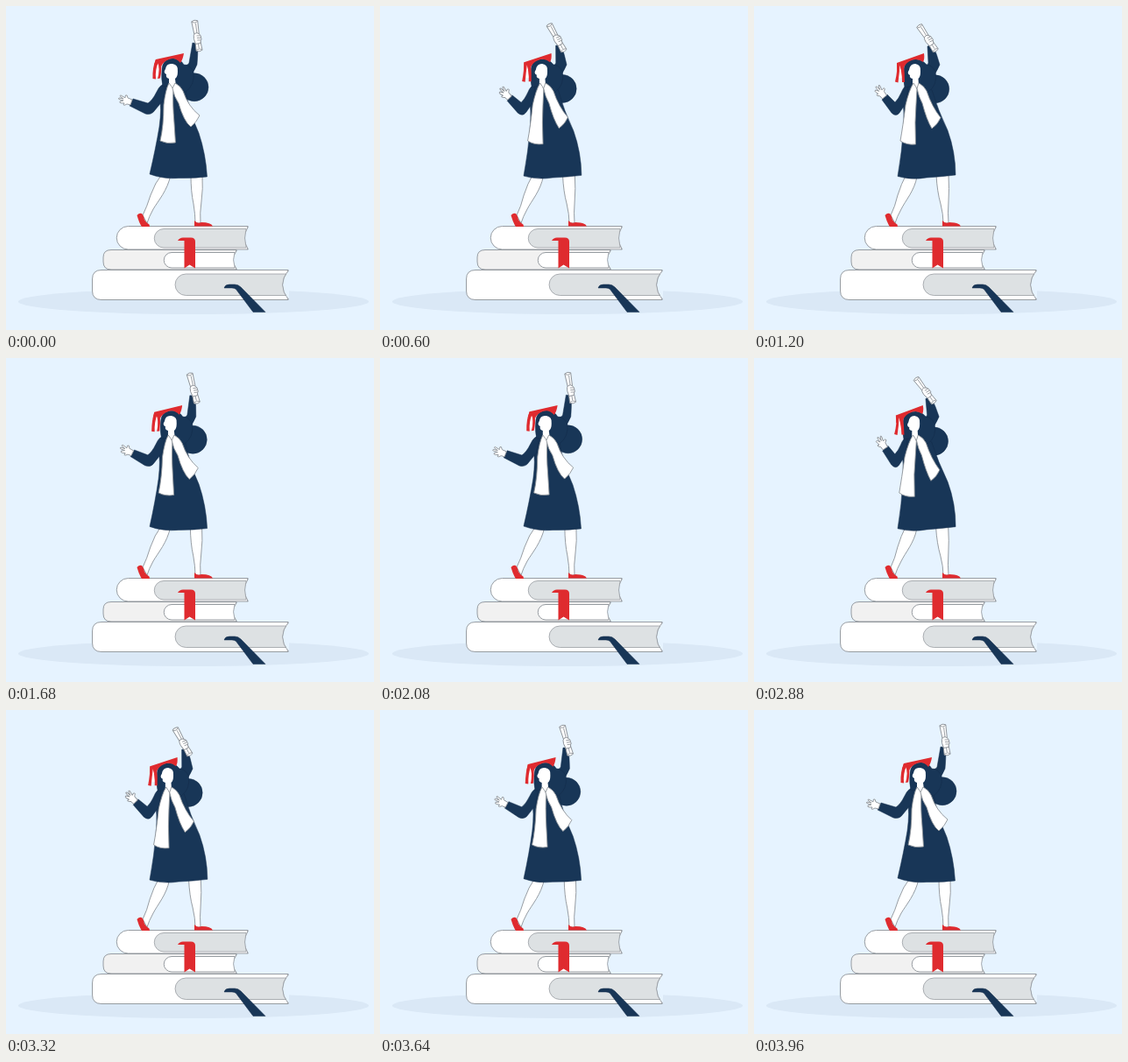
Animation, 420 px wide and 370 px high, one loop 4 s. Source, as an HTML page:

```html
<!DOCTYPE html>
<html lang="en">
<head>
<meta charset="utf-8">
<title>Graduate on books</title>
<style>
html, body { margin: 0; width: 100%; height: 100%; overflow: hidden; background: #e6f3ff; }
svg { display: block; width: 100%; height: 100%; }
.white { fill: #fff; stroke: #8d9298; stroke-width: .9; stroke-linejoin: round; }
.page { fill: #dde1e3; stroke: #9a9ea3; stroke-width: .8; }
.navy { fill: #183657; stroke: #122b48; stroke-width: .5; stroke-linejoin: round; }
.red { fill: #df2b2f; }
.line { fill: none; stroke: #8d9298; stroke-width: .8; stroke-linecap: round; }
</style>
</head>
<body>
<svg viewBox="0 0 420 370">
  <ellipse cx="214" cy="337.500" rx="200" ry="14.500" fill="#dae8f6"/>

  <g id="books">
    <path class="white" d="M322 301.500H109Q98.500 301.500 98.500 312V325Q98.500 335.500 109 335.500H322Z"/>
    <path class="page" d="M320 306H205.300A12.250 12.250 0 0 0 205.300 330.500H320Q312 318 320 306Z"/>
    <path d="M323 302.500Q309 318.500 323 334.500Z" fill="#e6f3ff"/>
    <path class="line" d="M322 302Q309 318.500 322 335"/>

    <path class="white" d="M263 278.500H120Q111 278.500 111 287V292Q111 301 120 301H263Z" style="fill:#f1f1f1"/>
    <path class="white" d="M261 281.500H189A8.750 8.750 0 0 0 189 299H261Z"/>
    <path d="M264 279.500Q255 290 264 300.500Z" fill="#e6f3ff"/>
    <path class="line" d="M263 279Q256 290 263 300.500"/>

    <path class="white" d="M276 251.500H139.500A13.250 13.250 0 0 0 139.500 278H276Z"/>
    <path class="page" d="M274 254.500H180A10.750 10.750 0 0 0 180 276H274Z"/>
    <path d="M277 252.500Q268 265 277 277.500Z" fill="#e6f3ff"/>
    <path class="line" d="M276 252Q269 265 276 278"/>

    <path class="red" d="M196 268Q198 264.500 202 264.500H211Q216 264.500 216 269V299.500L209.500 295.500L203.500 299.500V268Z"/>
    <path class="navy" d="M249 322Q250 318 255 318H261Q265 318 268 321L296 349.500H282L262.500 323.500Q261 322 258 322Z"/>
  </g>

  <g id="legs">
    <path class="white" d="M178 192Q170 202 165 216Q161 229 156 239L161 248Q163 241 168 232C174 222 184 211 188 193Z"
      data-to="M174 192Q168 203 164 216Q161 229 156 239L161 248Q163 241 168 232C173 222 183 211 186 195Z"/>
    <path class="white" d="M211 193Q211 212 214 226Q216 238 216 248L222 248Q221 237 223 223Q225 209 224 193Z"
      data-to="M208 193Q209 212 213 226Q216 238 216 248L222 248Q221 237 222 223Q223 209 222 193Z"/>
    <path class="red" d="M149.500 239Q152 236 155 237Q157 239 158 244Q160 248 163.500 249.500L164 252H155Q152 248 149.500 239Z"/>
    <path class="red" d="M215 245Q218 249 223 247Q234 247 236 251.500H215Z"/>
  </g>

  <path class="navy" d="M213 42L219 43Q219 57 218 67Q214 77 206 86L196 84L199 69Q208 68 209 65Z"
    data-to="M198 46L204 44Q209 56 212 67Q208 77 200 86L189 84L191 68Q198 69 199 65Z"/>
  <circle class="navy" r="16" transform="translate(215 92.700)" data-to="translate(206.700 94.800)"/>

  <path class="navy" d="M182 89Q175 92 175 104Q178 116 175 138Q171 162 164 192Q180 198 197 196.500Q214 197 229.500 195Q228 169 220 145Q209 121 205 96Q199 89 190 88Z"
    data-to="M176 90Q170 93 169 105Q172 118 170.500 139Q169 166 164 194.500Q180 199 197 196Q214 195 230 193Q230 167 221 142Q210 119 203 96Q193 89 184 88Z"/>
  <path class="navy" d="M182 89Q176 89 172 98Q167 108 162 111L145 106L141 114L159 123Q166 125 170 119L179 108Z"
    data-to="M176 90Q171 91 168 99Q165 106 161 110L152 101L146 107L157 122Q162 127 166 122L174 110Z"/>

  <g class="white" transform="translate(143 110) rotate(0)" data-to="translate(149 104) rotate(34)">
    <path d="M1 -3L-4 -5L-5 -8Q-7 -9 -7 -6L-7 -5L-12 -8Q-14 -8 -12 -6L-9 -4L-14 -5Q-16 -4 -13 -3L-9 -2L-13 -1Q-14 1 -11 1L-8 1L-9 3Q-8 4 -5 2L-1 3Z"/>
  </g>

  <path class="navy" d="M178 74Q178 60 191 60Q199 60 203 67Q210 67 214 75Q216 90 205 98Q196 94 194 90L179 92Q177 82 178 74Z"
    data-to="M171 75Q171 61 184 61Q191 60 197 67Q203 67 207 75Q210 90 199 98Q189 94 188 90L172 93Q170 83 171 75Z"/>
  <path fill="#fff" d="M182 72Q183 65 190 66Q197 67 196 75Q196 81 193 83L194 91L190 94L186 91L186 83Q182 82 183 78Q179 76 182 72Z"
    data-to="M177 73Q178 66 184 66Q191 67 190 75Q190 81 187.500 83L188 91L186 94L181 91L181 83Q177 82 178 79Q174 77 177 73Z"/>

  <path class="white" d="M186 88Q189 92 191 95Q190 111 192 133L193.500 156Q184 158 176 154Q180 137 180 113Q182 96 186 88Z"
    data-to="M182 88Q185 92 186 95Q185 111 184 133L184.500 158Q174 159 167 154Q170 137 173 113Q177 96 182 88Z"/>
  <path class="white" d="M193 88Q199 91 202 97Q208 115 221 125Q218 132 211 138Q203 132 197 111Q192 104 190 94Z"
    data-to="M188 88Q194 91 197 97Q203 115 213 127.500Q210 135 203 140Q197 130 192 111Q188 104 186 94Z"/>

  <g id="cap">
    <path class="red" d="M171 61L203 54Q202 61 199 65Q193 58 186 61Q180 63 177 69L174 80L169 68Z"
      data-to="M163 65L194 54Q195 60 193 64Q186 59 180 62Q174 64 171 70L170 80L163 73Z"/>
    <path d="M173 65Q176 70 174 82Q170 82 170 80Q170 71 173 65Z" fill="#fff"
      data-to="M166 67Q169 73 169 82Q165 83 165 81Q166 74 166 67Z"/>
    <path class="red" d="M171 61Q167 70 167.500 83L171 83.500Q170 73 174 64Z"
      data-to="M163 65Q164 74 161 86.500L164.500 87.500Q166 76 166.500 67Z"/>
    <path class="red" d="M174 63Q176 72 173 83L176 82.500Q178 73 177 66Z"
      data-to="M166 66Q169 75 169 87L172 87Q172 77 171 68Z"/>
  </g>

  <g transform="translate(218 34) rotate(-9)" data-to="translate(198 36.700) rotate(-33.500)">
    <path class="white" d="M-3.500 -17Q0 -19 3.500 -17L2.600 0L3.500 17Q0 19 -3.500 17L-2.600 0Z"/>
    <path class="line" d="M-3 -16Q0 -14 3 -16M.8 -14L0 14M-3 16Q0 14 3 16"/>
    <path class="white" d="M-3 9L-4 3Q-4 -2 -2 -3Q1 -4 2.500 -2Q5 0 4.300 3Q5 5 3.500 6L2.500 9Z"/>
    <path class="line" d="M0 0L3.500 .5M0 2.500L4 3M0 5L3.500 5.500"/>
  </g>
</svg>
<script>
const LOOP = 4000, SWING = 2000, STEP = 40;
const REACH = 0.864; // swing position at which the data-to pose is met
const NUM = /-?(?:\d+\.?\d*|\.\d+)/g;

const parts = [...document.querySelectorAll('[data-to]')].map(el => {
  const attr = el.hasAttribute('d') ? 'd' : 'transform';
  const from = el.getAttribute(attr);
  return { el, attr, from, to: el.dataset.to.match(NUM).map(Number) };
});

const blend = (from, to, k) => {
  let i = 0;
  return from.replace(NUM, n => (+n + (to[i++] - n) * k).toFixed(2));
};

function draw(ms) {
  const t = Math.floor((ms % LOOP) / STEP) * STEP + STEP;
  const k = (1 - Math.cos(2 * Math.PI * t / SWING)) / 2 / REACH;
  for (const p of parts) p.el.setAttribute(p.attr, blend(p.from, p.to, k));
}

const start = performance.now();
function tick() {
  draw(performance.now() - start);
  requestAnimationFrame(tick);
}
tick();
</script>
</body>
</html>
```
